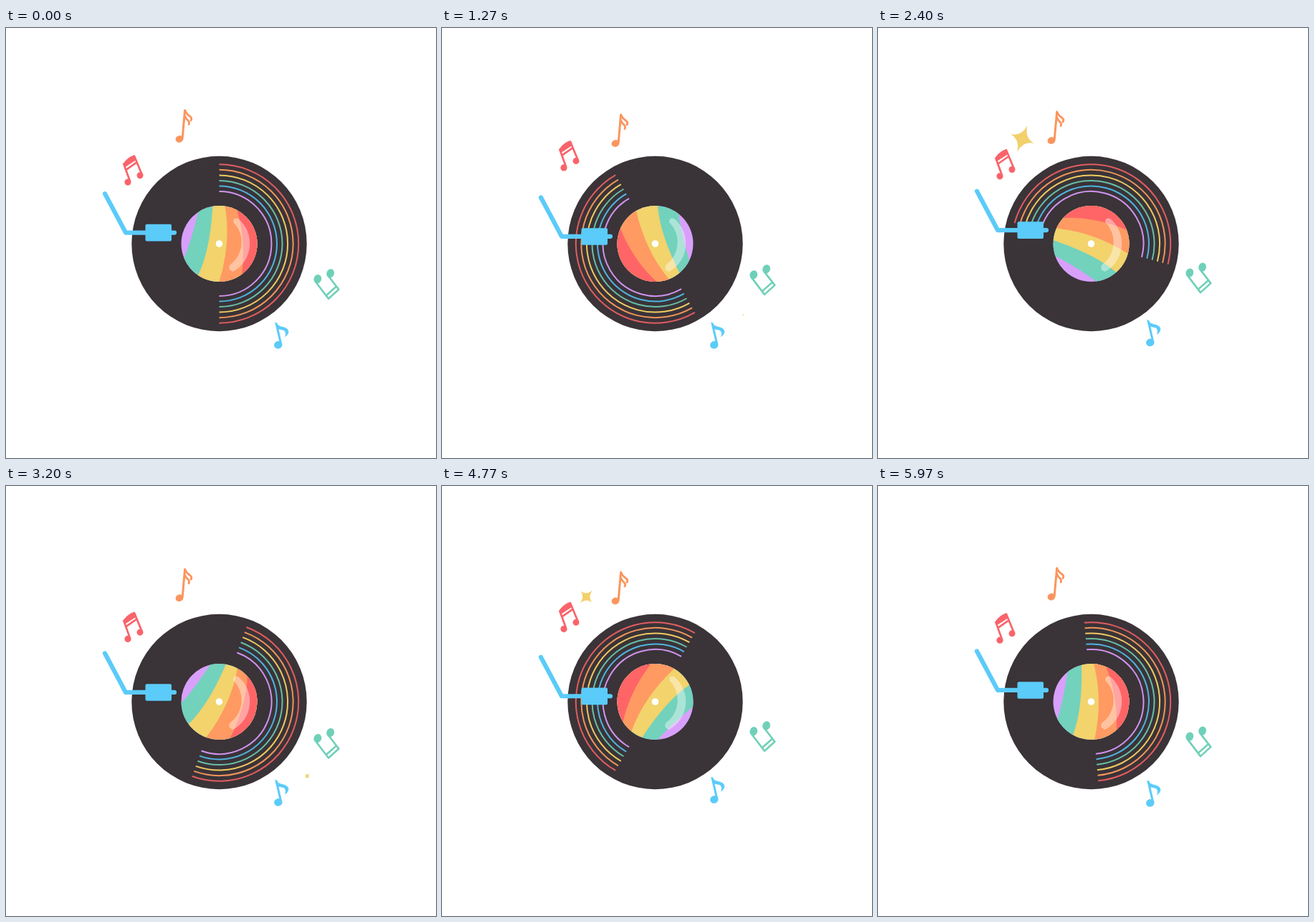
Animation, 600 px wide and 600 px high, one loop 6.01 s. Source, as an HTML page:

```html
<!DOCTYPE html>
<html lang="en">
<head>
<meta charset="utf-8">
<title>Spinning record</title>
<style>
  html, body { margin: 0; width: 100%; height: 100%; overflow: hidden; background: #fff; }
  svg { display: block; width: 100vw; height: 100vh; }
  .line { fill: none; stroke-linecap: round; stroke-linejoin: round; }
  .note { fill: var(--ink); stroke: var(--ink); }
  .note circle, .note ellipse { stroke: none; }
</style>
</head>
<body>
<svg viewBox="0 0 600 600">
  <defs><clipPath id="labelClip"><circle r="53"/></clipPath></defs>

  <g transform="translate(297.5 301)">
    <circle r="122.2" fill="#3a3338"/>
    <g id="spin">
      <g id="grooves" fill="none" stroke-width="2"></g>
      <g id="label" clip-path="url(#labelClip)">
        <circle r="54" fill="#d8a0fb"/>
        <path fill="#72d2bc" d="M-29 -46Q-37 -10 -49 20L-73 30L90 120V-120L-43 -69Z"/>
        <path fill="#f2d36c" d="M-9 -53Q-12.5 10 -30 45L-45 68L90 120V-120L-13 -80Z"/>
        <path fill="#ff9a62" d="M8 -53Q17 -2 0 53V80L90 120V-120L12 -80Z"/>
        <path fill="#ff6566" d="M24.5 -48Q38 -5.500 31.500 43L47 65L90 120V-120L37 -72Z"/>
      </g>
    </g>
  </g>
  <path fill="#fff" opacity=".4" d="M317 271Q317 264 324 266A45 45 0 0 1 317 340Q308 337 313 330A39 39 0 0 0 317 271Z"/>
  <circle cx="297.5" cy="301" r="4.8" fill="#fff"/>

  <g id="arm" fill="#5bcbf9">
    <path class="line" stroke="#5bcbf9" stroke-width="6.2" d="M138 231L167 285.4H235"/>
    <rect x="194.5" y="273.7" width="36.5" height="23.6" rx="2"/>
  </g>

  <g id="orange" class="note" style="--ink:#fb955d">
    <ellipse cx="242" cy="155" rx="5.5" ry="4.8" transform="rotate(-20 242 155)"/>
    <path class="line" stroke-width="3" d="M249.6 115L246.2 153.5"/>
    <path class="line" stroke-width="2.8" d="M250 115.500Q252 120.500 257 123.500Q260 126 258 129M250 123.500Q251.500 127.500 254 129Q256.500 131.500 255 134.500"/>
  </g>

  <g id="red" class="note" style="--ink:#f9646b">
    <circle cx="170" cy="214.800" r="4.600"/>
    <circle cx="187" cy="205.500" r="4.500"/>
    <path class="line" stroke-width="2.700" d="M164.500 190L172.800 213M179 178.500L189.600 204M167.500 197.500L182.500 187"/>
    <path stroke-width="1" stroke-linejoin="round" d="M163.500 189.500Q170 180 179 177.500L181.500 183.500L166 193.500Z"/>
  </g>

  <g id="green" class="note" style="--ink:#6fd0b8">
    <ellipse cx="434.800" cy="350.500" rx="5.300" ry="6.200" transform="rotate(20 434.800 350.500)"/>
    <ellipse cx="452.600" cy="342.600" rx="5.300" ry="6.200" transform="rotate(20 452.600 342.600)"/>
    <path class="line" stroke-width="2.600" d="M432.500 355L450 378L464.300 365L450 346.500M446.800 373.500L461 360.800"/>
  </g>

  <g id="blue" class="note" style="--ink:#5bcbf9">
    <ellipse cx="379.800" cy="441.500" rx="5.800" ry="5.300" transform="rotate(-20 379.800 441.500)"/>
    <path class="line" stroke-width="3" d="M377.200 412L383.600 440"/>
    <path stroke-width=".6" d="M375.500 410Q379 415.500 388 417Q394.500 419 394 424Q393 428 389.500 430Q391.500 424 388 421Q382 419.500 378.500 419Z"/>
  </g>

  <path class="star" fill="#f2d06b"/>
  <path class="star" fill="#f2d06b"/>
</svg>
<script>
const LOOP = 6010, HALF = 72, DEGREES_PER_STEP = 5;
const $ = id => document.getElementById(id);
const cosDeg = a => Math.cos(a * Math.PI / 180);

// Half-circle grooves, outermost first
['#e15d5f', '#f0955a', '#eecb62', '#67bfa5', '#4fb4e0', '#cf94ee'].forEach((color, i) => {
  const r = 110.7 - 7.55 * i;
  const path = document.createElementNS('http://www.w3.org/2000/svg', 'path');
  path.setAttribute('d', `M0 ${-r}A${r} ${r} 0 0 1 0 ${r}`);
  path.setAttribute('stroke', color);
  $('grooves').append(path);
});

// Vertical drift: a slow wave plus one twice as fast, once per turn of the record
const wave = (mid, a, p, b, q) => turn => mid + a * cosDeg(turn - p) + b * cosDeg(2 * turn - q);
const drift = {
  orange: wave(3.8, 3.3, 150, 1.2, 150),
  red: wave(-11, 9.5, -20, 2.5, 20),
  arm: wave(2.5, 4.5, 150, 3.1, 60),
  green: wave(-4.5, 5.5, 50, 1.4, 60),
  blue: wave(-1.3, 2, 60, 2, -60)
};

// Stars swell and shrink in turn; u runs from 0 to 1 over one appearance
const stars = [
  { start: 36.1, span: 32, size: 22, x: 201.3, y: () => 154.5, turn: u => 54 - 50 * u },
  { start: 1.4, span: 29.4, size: 17, x: 420.3, y: u => 407 - 10.5 * Math.sin(Math.PI * .8 * u), turn: u => 46 - 20 * u }
];
const starPaths = document.querySelectorAll('.star');
starPaths.forEach(p => p.setAttribute('d', 'M0 -1Q.12 -.12 .9 0Q.12 .12 0 1Q-.12 .12 -.9 0Q-.12 -.12 0 -1Z'));

// 24 poses per second shown on a 30 per second clock
function stepAt(t) {
  const tick = Math.min(179, Math.floor(t * .03 + .12));
  return Math.floor(tick * 4 / 5);
}

function draw(step) {
  const turn = step * DEGREES_PER_STEP;
  $('spin').setAttribute('transform', `rotate(${turn})`);
  for (const id in drift) $(id).setAttribute('transform', `translate(0 ${drift[id](turn)})`);
  stars.forEach((star, i) => {
    const u = (step % HALF - star.start) / star.span;
    const size = u > 0 && u < 1 ? star.size * Math.sin(Math.PI * u) : 0;
    starPaths[i].setAttribute('transform',
      `translate(${star.x} ${star.y(u)}) rotate(${star.turn(u)}) scale(${size})`);
  });
}

const begin = performance.now();
function frame() {
  draw(stepAt((performance.now() - begin) % LOOP));
  requestAnimationFrame(frame);
}
frame();
</script>
</body>
</html>
```
